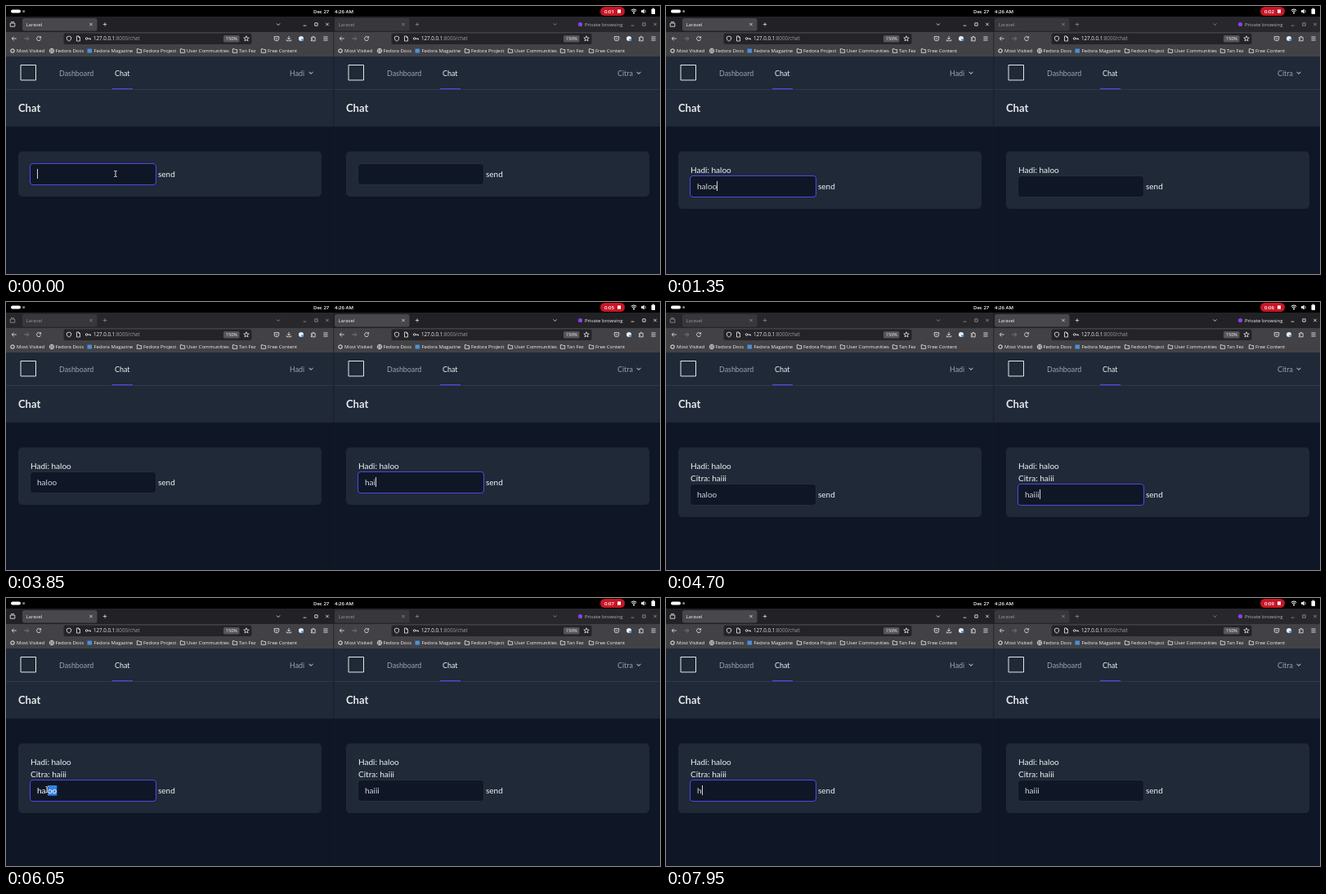
These frames come from a looping animation (800 by 329 pixels, 8 s). An HTML page with a canvas:

```html
<!DOCTYPE html>
<html lang="en">
<head>
<meta charset="utf-8">
<title>Chat between two browser windows</title>
<style>
html, body { margin: 0; width: 100%; height: 100%; overflow: hidden; background: #0f1726; }
canvas { display: block; width: 800px; height: 329px; }
</style>
</head>
<body>
<canvas id="stage" width="800" height="329"></canvas>
<script>
const ctx = document.getElementById('stage').getContext('2d');
const LOOP = 8000, STEP = 50, HALF = 401;
const UI = '"Open Sans", "Noto Sans", sans-serif';
const PAGE = 'Lato, "Open Sans", sans-serif';
const LEFT = 'Hadi', RIGHT = 'Citra';

// [time, value] lists: the last entry reached is in force
const at = (list, t) => list.reduce((v, [start, value]) => t >= start ? value : v, list[0][1]);

const clock = [[0, 1], [650, 2], [1650, 3], [2650, 4], [3650, 5], [4650, 6], [5650, 7], [6650, 8], [7600, 9]];
const leftText = [[0, ''], [150, 'h'], [300, 'ha'], [600, 'hal'], [650, 'halo'], [750, 'haloo'], [7900, 'h']];
const rightText = [[0, ''], [3400, 'h'], [3500, 'ha'], [3850, 'hai'], [4000, 'haii'], [4150, 'haiii']];
const messageCount = [[0, 0], [1350, 1], [4700, 2]];
const active = [[0, 'left'], [2650, 'right'], [5850, 'left']];
const caretOn = [[0, true], [1150, false], [1250, true], [4500, false], [4650, true]];
const pointerOn = [[0, true], [150, false], [2050, true], [3400, false], [5450, true], [7900, false]];
const pointerPath = [
  [0, 134, 206], [2050, 134, 206], [2400, 485, 227], [2650, 484, 225], [5450, 484, 225],
  [5650, 232, 241], [5850, 76, 237], [5950, 66, 236], [6250, 13, 233], [6350, 10, 236]
];
const messages = [LEFT + ': haloo', RIGHT + ': haiii'];

function pointerAt(t) {
  const i = pointerPath.findIndex(p => p[0] > t);
  if (i < 0) return pointerPath[pointerPath.length - 1].slice(1);
  const [t0, x0, y0] = pointerPath[i - 1], [t1, x1, y1] = pointerPath[i];
  const k = (t - t0) / (t1 - t0), e = (k + k * k * (3 - 2 * k)) / 2;
  return [x0 + (x1 - x0) * e, y0 + (y1 - y0) * e];
}

function rect(x, y, w, h, color) {
  ctx.fillStyle = color;
  ctx.fillRect(x, y, w, h);
}
function round(x, y, w, h, r, fill, stroke, width = 0.7) {
  ctx.beginPath();
  ctx.roundRect(x, y, w, h, r);
  if (fill) { ctx.fillStyle = fill; ctx.fill(); }
  if (stroke) { ctx.strokeStyle = stroke; ctx.lineWidth = width; ctx.stroke(); }
}
function path(d, x, y, color, width = 0.8, fill) {
  ctx.save();
  ctx.translate(x, y);
  const shape = new Path2D(d);
  if (fill) { ctx.fillStyle = fill; ctx.fill(shape); }
  if (color) { ctx.strokeStyle = color; ctx.lineWidth = width; ctx.stroke(shape); }
  ctx.restore();
}
function disc(x, y, r, fill, stroke) {
  round(x - r, y - r, 2 * r, 2 * r, r, fill, stroke);
}
function text(s, x, y, size, color, family = UI, weight = 400) {
  ctx.font = `${weight} ${size}px ${family}`;
  ctx.fillStyle = color;
  ctx.fillText(s, x, y);
  return ctx.measureText(s).width;
}

const icons = {
  close: 'M-1.7-1.7L1.7 1.7M1.7-1.7L-1.7 1.7',
  plus: 'M-2.2 0H2.2M0-2.2V2.2',
  chevron: 'M-2-1L0 1L2-1',
  back: 'M2.7 0H-2.7M-.4-2.4L-2.8 0L-.4 2.4',
  forward: 'M-2.7 0H2.7M.4-2.4L2.8 0L.4 2.4',
  reload: 'M2.1-1.4A2.5 2.5 0 1 0 2.5.6M2.6-2.8V-.9H.7',
  shield: 'M0-3L2.6-2V0Q2.3 2.3 0 3.2Q-2.3 2.3-2.6 0V-2Z',
  page: 'M-2-3H.6L2-1.5V3H-2ZM.5-3V-1.4H2',
  key: 'M-3.2 0A1.3 1.3 0 1 0-.6 0A1.3 1.3 0 1 0-3.2 0M-.6 0H3V1.5M1.6 0V1.2',
  star: 'M0-3.2L.9-1L3.2-.9L1.4.6L2 2.9L0 1.6L-2 2.9L-1.4.6L-3.2-.9L-.9-1Z',
  pocket: 'M-2.8-2.4H2.8V0A2.8 2.8 0 0 1-2.8 0ZM-1.4-.7L0 .6L1.4-.7',
  download: 'M0-3V1M-1.7-.7L0 1L1.7-.7M-2.7 1.2V2.7H2.7V1.2',
  puzzle: 'M-2.6-1.4H-.8V-2.6H.7V-1.4H2.2V2.8H-2.6V1.2H-1.4V-.1H-2.6Z',
  menu: 'M-2.6-2.1H2.6M-2.6 0H2.6M-2.6 2.1H2.6',
  folder: 'M-2.7-2.3H-.6L.2-1.4H2.7V2.3H-2.7Z',
  globe: 'M-2.8 0H2.8M0-2.8Q-2.4 0 0 2.8Q2.4 0 0-2.8',
  view: 'M-2.8-1.4H2.8V2.7H-2.8ZM-2-2.8H2'
};
const icon = (name, x, y, color = '#eeeef0', width) => path(icons[name], x, y, color, width);

function topBar(t) {
  rect(0, 0, 800, 13, '#000');
  round(6, 4.5, 12, 4, 2, '#fff');
  disc(21.7, 6.5, 1.6, '#7d7d7d');
  text('Dec 27', 376, 8.8, 6, '#fff', UI, 600);
  text('4:26 AM', 402, 8.8, 6, '#fff', UI, 600);
  round(727, 1, 30, 11, 5.5, '#c91626');
  text('0:0' + at(clock, t), 732, 8.9, 6, '#fff', UI, 600);
  rect(748, 4.4, 4, 4.2, '#fff');
  path('M-3.3-1.2Q0-4 3.3-1.2M-2 .3Q0-1.5 2 .3', 768, 6.5, '#fff', 1);
  disc(768, 8.6, 1, '#fff');
  path('M-3-1.2H-1.4L.6-3V3L-1.4 1.2H-3Z', 780, 6.5, null, 0, '#fff');
  path('M1.7-1.6Q3 0 1.7 1.6', 780, 6.5, '#fff', 0.8);
  round(789.5, 3.5, 4.5, 6.5, 0.8, '#fff');
  rect(790.7, 2.6, 2, 1, '#fff');
}

function chrome(right, focused) {
  const ink = focused ? '#f4f4f5' : '#98989c';
  const shift = right ? -19 : 0;
  const widen = right ? 15 : 0;
  rect(0, 13, HALF, 19, focused ? '#222226' : '#28282c');
  rect(0, 32, HALF, 30, '#424246');
  if (!right) icon('view', 8, 22.5, ink);
  round(20 + shift, 15, 91.5, 15.5, 2.5, focused ? '#47474c' : '#38383c');
  text('Laravel', 24.5 + shift, 24.8, 6, ink);
  icon('close', 104 + shift, 22.5, ink, 0.7);
  icon('plus', 121 + shift, 22.5, ink, 0.7);
  icon('chevron', right ? 270.5 : 333, 22.5, ink);
  if (right) {
    disc(301.5, 22.5, 2.6, '#8b3ff0');
    text('Private browsing', 307, 24.8, 6, focused ? '#f4f4f5' : '#b4b4b8');
  }
  path('M-1.8 1.6H1.8', 365.5, 22.5, ink);
  path('M-1.7-1.7H1.7V1.7H-1.7Z', 379.5, 22.5, ink);
  icon('close', 393, 22.5, ink);

  icon('back', 10, 40);
  icon('forward', 25, 40, '#85858a');
  icon('reload', 40, 40);
  round(70.5, 33.5, 230 + widen, 13.5, 2.5, '#232328');
  icon('shield', 77, 40);
  icon('page', 88.5, 40);
  icon('key', 100.5, 40);
  const host = text('127.0.0.1', 107, 42.3, 6.2, '#f4f4f5');
  text(':8000/chat', 107 + host, 42.3, 6.2, '#9b9ba0');
  round(266 + widen, 36, 19.5, 8.5, 1.5, '#55555a');
  text('150%', 269 + widen, 42.3, 5.4, '#f4f4f5');
  icon('star', 294 + widen, 40);
  icon('pocket', right ? 346 : 331, 40);
  if (!right) icon('download', 346, 40);
  disc(361, 40, 3, '#eeeef0');
  disc(362.6, 41.6, 1.6, '#4b9be8');
  icon('puzzle', 376, 40);
  icon('menu', 391, 40);

  disc(8, 55, 2, null, '#eeeef0');
  for (let i = 0; i < 8; i++) {
    const a = i * Math.PI / 4;
    disc(8 + 2.5 * Math.cos(a), 55 + 2.5 * Math.sin(a), 0.6, '#eeeef0');
  }
  disc(56, 55, 2.8, null, '#eeeef0');
  icon('globe', 56, 55, '#eeeef0', 0.6);
  rect(99.5, 52.5, 5.5, 5, '#4b8fd6');
  [163, 216, 280, 315].forEach(x => icon('folder', x, 55));
  [['Most Visited', 13], ['Fedora Docs', 60.5], ['Fedora Magazine', 107.5], ['Fedora Project', 168],
   ['User Communities', 221], ['Tan Fez', 285], ['Free Content', 320]]
    .forEach(([label, x]) => text(label, x, 57.2, 6, '#f4f4f5'));
}

function page(user, value, count, focused, caret, pickedFrom) {
  rect(0, 62, HALF, 267, '#0f1726');
  rect(0, 62, HALF, 86, '#1f2937');
  rect(0, 102, HALF, 0.7, '#374151');
  round(18, 72.5, 18.5, 18.5, 0, null, '#e5e7eb', 1);
  text('Dashboard', 65, 86, 8.9, '#9ca3af', PAGE);
  text('Chat', 133, 86, 8.9, '#f3f4f6', PAGE);
  rect(130, 101, 25, 1.2, '#4f46e5');
  text(user, 347, 85.5, 8.9, '#9ca3af', PAGE);
  path('M-2.4-1.2L0 1.2L2.4-1.2', 373, 82, '#9ca3af', 1.1);
  text('Chat', 15, 129.6, 13, '#e5e7eb', PAGE, 700);

  const dy = 15 * count;
  round(15, 178.5, 371, 55.5 + dy, 5, '#1f2937');
  messages.slice(0, count).forEach((m, i) => text(m, 30, 204.5 + 15 * i, 10, '#f3f4f6', PAGE));
  round(29.5, 193.5 + dy, 154, 26, 3.8, '#0f1726', focused ? '#4f46e5' : '#2b3646', focused ? 1.1 : 0.7);
  ctx.font = `10px ${PAGE}`;
  const xAfter = n => 38 + ctx.measureText(value.slice(0, n)).width;
  const end = xAfter(value.length), start = xAfter(pickedFrom);
  const picked = pickedFrom < value.length;
  if (picked) rect(start, 200 + dy, end - start, 12.5, '#3584e4');
  text(value, 38, 209.6 + dy, 10, picked ? '#fff' : '#d1d5db', PAGE);
  if (focused && caret && !picked) rect(Math.round(end), 200 + dy, 1, 12, '#d1d5db');
  text('send', 186, 209.6 + dy, 10, '#f3f4f6', PAGE);
}

function pointer(x, y, count) {
  const localX = x % HALF, top = 193 + 15 * count;
  const overInput = localX > 30 && localX < 184 && y > top && y < top + 26;
  if (overInput) {
    const beam = 'M-1.8-3.6Q0-3.6 0-2.6Q0-3.6 1.8-3.6M0-2.6V2.6M-1.8 3.6Q0 3.6 0 2.6Q0 3.6 1.8 3.6';
    path(beam, x, y, '#111', 2);
    path(beam, x, y, '#e5e5e5', 1);
  } else {
    path('M0 0V7.4L1.7 5.9L2.9 8.4L4.1 7.9L3 5.4L5.3 5.2Z', x, y, '#e8e8e8', 0.8, '#111');
  }
}

function inWindow(x, draw) {
  ctx.save();
  ctx.translate(x, 0);
  ctx.beginPath();
  ctx.rect(0, 13, HALF, 316);
  ctx.clip();
  draw();
  ctx.restore();
}

function render(t) {
  const onLeft = at(active, t) === 'left';
  const count = at(messageCount, t), caret = at(caretOn, t);
  const [x, y] = pointerAt(t);
  const typed = at(leftText, t);
  const dragging = t >= 5850 && t < 7900;
  const pickedFrom = dragging ? Math.max(0, Math.min(5, Math.round((x - 38) / 4.9))) : typed.length;
  const reply = at(rightText, t);

  inWindow(0, () => {
    chrome(false, onLeft);
    page(LEFT, typed, count, onLeft, caret, pickedFrom);
  });
  inWindow(HALF, () => {
    chrome(true, !onLeft);
    page(RIGHT, reply, count, !onLeft, caret, reply.length);
  });
  rect(400.5, 13, 0.7, 316, '#1a1a1e');
  topBar(t);
  if (at(pointerOn, t)) pointer(x, y, count);
}

const began = performance.now();
function frame() {
  const t = (performance.now() - began) % LOOP;
  render(Math.floor(t / STEP) * STEP);
  requestAnimationFrame(frame);
}
frame();
</script>
</body>
</html>
```
